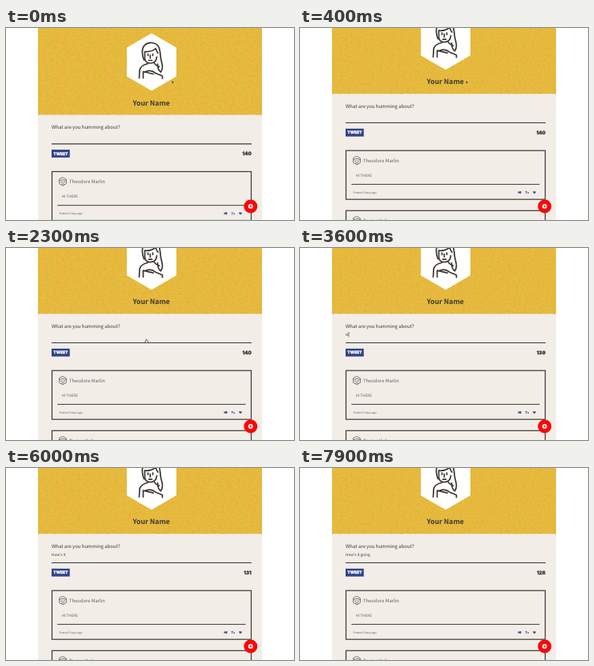
An HTML page that plays this animation: 360 by 240 pixels, repeating every 8000 ms.

```html
<!DOCTYPE html>
<html lang="en">
<head>
<meta charset="utf-8">
<title>Humming page</title>
<style>
  html, body { margin: 0; width: 100%; height: 100%; overflow: hidden; background: #fff; }
  svg { display: block; width: 360px; height: 240px; }
  text {
    font-family: "Noto Sans CJK JP", "Noto Sans CJK SC", "Noto Sans", sans-serif;
    fill: #3b3a38; white-space: pre; text-rendering: geometricPrecision;
  }
  .heading { font-size: 8.7px; font-weight: 700; text-anchor: middle; }
  .label { font-size: 6px; }
  .name { font-size: 5.85px; fill: #62605d; }
  .body { font-size: 4.6px; fill: #62605d; }
  .date { font-size: 3.5px; fill: #62605d; }
  .typed { font-size: 4.7px; }
  .block { font-family: Inter, "DejaVu Sans", sans-serif; font-weight: 900; stroke-width: .25px; }
  .tweet { font-size: 4.9px; fill: #fff; stroke: #fff; text-anchor: middle; }
  .count { font-size: 6.1px; stroke: #3b3a38; text-anchor: end; }
  .line { fill: none; stroke: #3b3a38; stroke-width: 1.2px; }
  .sketch { fill: none; stroke: #3d3931; stroke-width: 1.7px; stroke-linecap: round; stroke-linejoin: round; }
  .face { fill: none; stroke: #55524e; stroke-width: .75px; stroke-linecap: round; stroke-linejoin: round; }
  .icon { fill: #3c4f94; }
</style>
</head>
<body>
<svg viewBox="0 0 360 240">
  <defs>
    <filter id="paper" x="0" y="0" width="100%" height="100%">
      <feTurbulence type="fractalNoise" baseFrequency=".3 .42" numOctaves="2" seed="4"/>
      <feColorMatrix values="0 0 0 0 .55  0 0 0 0 .38  0 0 0 0 .05  .9 0 0 0 -.36"/>
    </filter>
    <g id="avatar" class="face">
      <path d="M71 186.8 75.4 189.2V194.6L71 197.2 66.6 194.6V189.2Z"/>
      <path d="M67 190.6Q71 188.6 75 190.6M68.6 192.6H70.4M71.8 192.6H73.6M69.4 195.2Q71 194 72.6 195.2"/>
    </g>
  </defs>

  <g id="page">
    <rect x="40" y="0" width="280" height="290" fill="#f2ede7"/>
    <rect x="40" y="0" width="280" height="108.5" fill="#e9bb3d"/>
    <rect x="40" y="0" width="280" height="108.5" filter="url(#paper)"/>
    <path d="M182 6.5 213 24.5V60.5L182 78.5 151 60.5V24.5Z" fill="#fff"/>

    <g class="sketch">
      <path d="M172.5 40C169.5 33 169.5 25 173.5 21.5C178 17 187 17.5 190.5 23C193 27 192.5 32 193.5 38C194.5 44 197.5 49 193.5 55C190.5 53 189.5 49 189.5 45"/>
      <path d="M173.5 29.5C179 30 184 28.5 187 25.5C188 28 188.5 30 190 31.5"/>
      <path d="M173.5 30V38C174 42 177 44 180.5 44C185 44 188 41 188.5 36"/>
      <path d="M177.5 32.5V34.5M183.5 32.5V34.5M180.3 34V37.5M178.5 40.5H182.5"/>
      <path d="M177.5 44.5C171.5 46 167.5 48 167 53L166.5 62.5M185.5 44C186.5 46.5 189.5 47 191.5 48.5"/>
      <path d="M171.5 62.5V54.5L184 57.5M173.5 55C178 52.5 183 53 187 56.5L195.5 60V63"/>
    </g>

    <text class="heading" x="181.7" y="96.6">Your Name</text>
    <text class="label" x="57" y="126.2">What are you humming about?</text>
    <text class="typed" id="typed" x="57" y="136.1"></text>
    <rect id="caret" y="131.3" width=".6" height="6.2" fill="#222"/>
    <path class="line" d="M57 144.8H307"/>

    <rect x="57" y="152.1" width="22.7" height="9.8" fill="#2f4289"/>
    <text class="block tweet" x="68.3" y="158.8">TWEET</text>
    <text class="block count" id="count" x="306.8" y="158.9">140</text>

    <rect class="line" x="57.5" y="179.5" width="249" height="61"/>
    <use href="#avatar"/>
    <text class="name" x="79" y="194.1">Theodore Marlin</text>
    <text class="body" x="69.8" y="212.1">HI THERE</text>
    <path class="line" d="M64.3 221.7H299.5" style="stroke-width:1px"/>
    <text class="date" x="66.5" y="233.1">Posted 5 days ago</text>
    <g class="icon">
      <path d="M272.6 230.2 274.4 231.2V230.2H276.4V233.2H274.4V232.2L272.6 233.2Z"/>
      <path d="M281.6 230.4H284V231.1H283.2V233.2H282.4V231.1H281.6ZM284.3 231.2H285.8V233.2H284.3V232.6H285.1V231.8H284.3Z"/>
      <path d="M293 233.6 291.2 231.8Q290.9 230.2 292 230.2 292.7 230.2 293 230.9 293.3 230.2 294 230.2 295.1 230.2 294.8 231.8Z"/>
    </g>

    <rect class="line" x="57.5" y="254.6" width="249" height="61"/>
    <use href="#avatar" y="75.1"/>
    <text class="name" x="79" y="269.2">Dorian Hale</text>
  </g>

  <circle cx="305.8" cy="222.9" r="8.5" fill="#f80808"/>
  <circle cx="305.8" cy="222.9" r="2.9" fill="#fff"/>
  <path d="M304.2 222.9H307.4M305.8 221.3V224.5" stroke="#f80808" stroke-width=".9"/>

  <g id="cursor">
    <path id="arrow" d="M0 0V3.4L.8 2.7 1.4 3.9 2 3.6 1.5 2.5H2.5Z" fill="#111" stroke="#fff" stroke-width=".25"/>
    <path id="hand" d="M-.6-1.8Q0-2.4.5-1.7V-.5L2 0V1.4L1.4 2.4H-.5L-1.9.6-1.4.2-.6.8Z" fill="#fff" stroke="#222" stroke-width=".6"/>
  </g>
</svg>
<script>
  const LOOP = 8000, STEP = 100, FOCUS = 2900;
  const MESSAGE = "How's it going";
  // moment each character is typed, in ms
  const KEYS = [3500, 3900, 4200, 4500, 4800, 5200, 5250, 5300, 5400, 6300, 6500, 6700, 6900, 7100];
  const el = id => document.getElementById(id);
  const [page, typed, caret, count, cursor, arrow, hand] =
    ["page", "typed", "caret", "count", "cursor", "arrow", "hand"].map(el);

  const ease = (t, from, to) => {
    const p = Math.min(1, Math.max(0, (t - from) / (to - from)));
    return p * p * (3 - 2 * p);
  };
  const show = (node, on) => node.setAttribute("visibility", on ? "visible" : "hidden");

  function draw(t) {
    page.setAttribute("transform", `translate(0 ${-26.3 * ease(t, 0, 350)})`);

    const n = KEYS.filter(k => k <= t).length;
    typed.textContent = MESSAGE.slice(0, n);
    count.textContent = 140 - n;

    const last = n ? KEYS[n - 1] : FOCUS;
    caret.setAttribute("x", 57.2 + (n ? typed.getComputedTextLength() : 0));
    show(caret, t >= FOCUS && (t - last) % 1000 < 500);

    const m = ease(t, 900, 2000);
    cursor.setAttribute("transform", `translate(${207.5 - 32 * m} ${65.8 + 50.4 * m})`);
    show(arrow, t < 1900);
    show(hand, t >= 1900 && t < FOCUS);
  }

  const start = performance.now();
  function tick() {
    const t = (performance.now() - start) % LOOP;
    draw(Math.floor(t / STEP) * STEP);
    requestAnimationFrame(tick);
  }
  tick();
</script>
</body>
</html>
```
